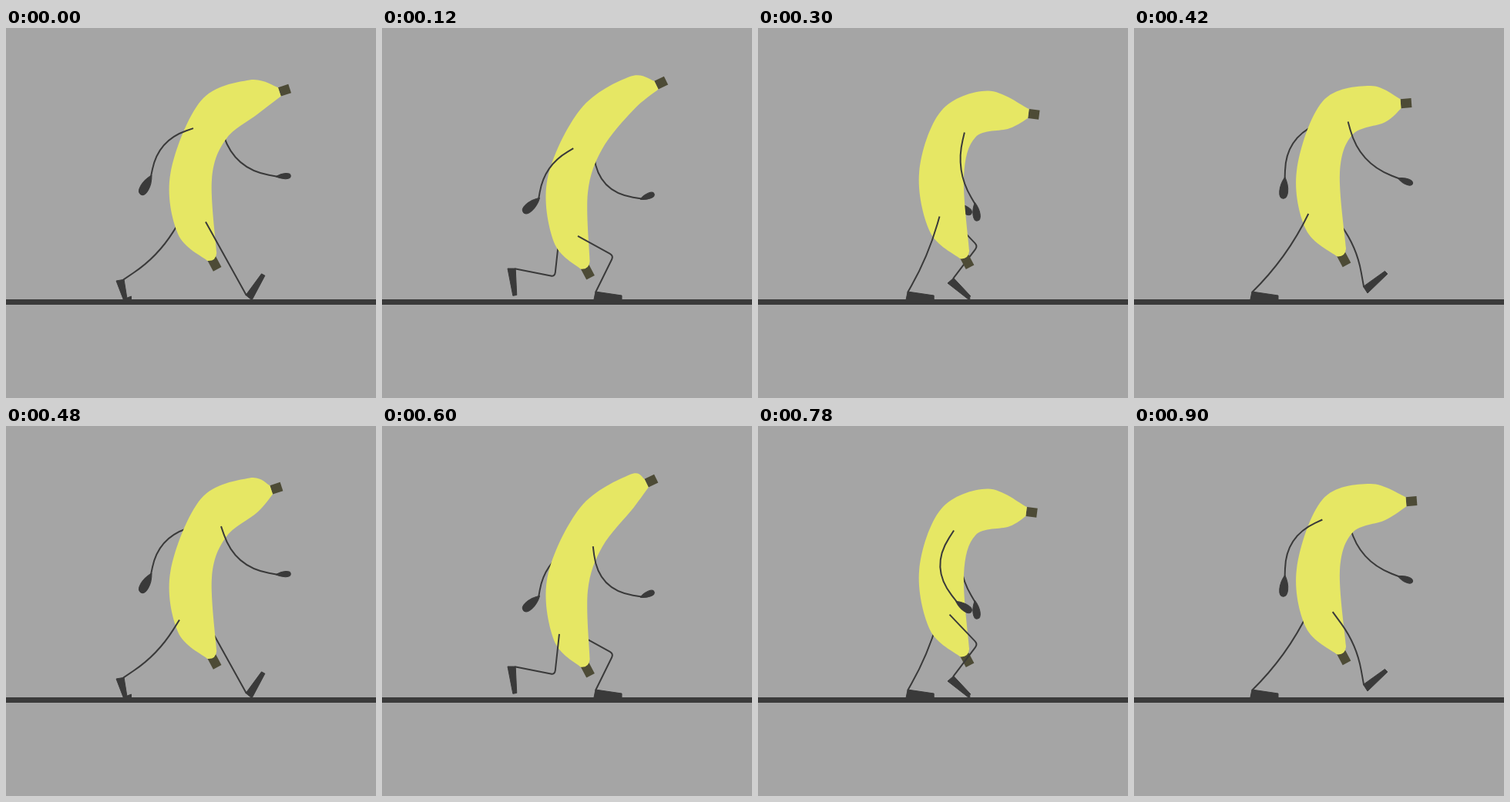
Write an HTML page with a canvas that moves like this. It is 480x480 px and loops after 0.96 s.

```html
<!DOCTYPE html>
<html lang="en">
<head>
<meta charset="utf-8">
<title>Walking banana</title>
<style>
  html, body { margin: 0; width: 100%; height: 100%; overflow: hidden; background: #a5a5a5; }
  canvas { display: block; width: 480px; height: 480px; }
</style>
</head>
<body>
<canvas id="stage" width="480" height="480"></canvas>
<script>
const ctx = document.getElementById('stage').getContext('2d');
const STEPS = 16, STEP_MS = 60, GROUND = 352;
const DARK = '#3a3a3a', YELLOW = '#e6e764', STEM = '#4d4b36', GREY = '#a5a5a5';
const BONE = 53, FOOT = 36;
const RAD = Math.PI / 180;

// One stride of the foot: step, heel x, heel y, pitch in degrees.
const STRIDE = [
  [0, 319, 353, -62],
  [2, 275, 352, 0],
  [7, 151, 352, 0],
  [8, 143, 328, 69],
  [10, 163, 312, 79],
  [13, 246, 331, 38],
  [15, 303, 344, -44]
];

const clamp = (v, lo, hi) => Math.max(lo, Math.min(hi, v));
const mix = (a, b, u) => a + (b - a) * u;

// Swing repeats once per loop, bob once per footfall.
const swing = (step, lag = 0) => Math.cos(step * Math.PI / 8 - lag * RAD);
const bob = (step, peak) => Math.cos((step - peak) * Math.PI / 4);

// Cyclic cubic interpolation that never overshoots its keys.
function strideAt(step) {
  const n = STRIDE.length;
  const key = i => {
    const turn = Math.floor(i / n), [t, ...v] = STRIDE[i - turn * n];
    return [t + turn * STEPS, ...v];
  };
  let i = n - 1;
  while (STRIDE[i][0] > step) i--;
  const [a, b, c, d] = [key(i - 1), key(i), key(i + 1), key(i + 2)];
  const h = c[0] - b[0], u = (step - b[0]) / h, v = 1 - u;
  const slope = (p, q, k) => (q[k] - p[k]) / (q[0] - p[0]);
  const tangent = (s, r) => s * r > 0 ? 2 * s * r / (s + r) : 0;
  return [1, 2, 3].map(k => {
    const mid = slope(b, c, k);
    const m0 = tangent(slope(a, b, k), mid), m1 = tangent(mid, slope(c, d, k));
    return (1 + 2 * u) * v * v * b[k] + u * u * (3 - 2 * u) * c[k] + h * u * v * (v * m0 - u * m1);
  });
}

function fill(color) {
  ctx.fillStyle = color;
  ctx.fill();
}

function stroke(color, width) {
  ctx.strokeStyle = color;
  ctx.lineWidth = width;
  ctx.stroke();
}

// Two-part line whose joint is pushed sideways by `bend` and softened by `round`.
function limb(x0, y0, x1, y1, bend, round) {
  const len = Math.hypot(x1 - x0, y1 - y0);
  const jx = (x0 + x1) / 2 + (y1 - y0) / len * bend;
  const jy = (y0 + y1) / 2 - (x1 - x0) / len * bend;
  ctx.beginPath();
  ctx.moveTo(x0, y0);
  ctx.lineTo(mix(jx, x0, round), mix(jy, y0, round));
  ctx.quadraticCurveTo(jx, jy, mix(jx, x1, round), mix(jy, y1, round));
  ctx.lineTo(x1, y1);
  stroke(DARK, 2);
}

function leg(step) {
  const hipX = 242 + 17 * swing(step), hipY = 254 + 16 * bob(step, 2.2);
  const [x, y, pitch] = strideAt(step);
  const c = Math.cos(pitch * RAD), s = Math.sin(pitch * RAD);
  const ankleX = x + 9 * s + 2 * c, ankleY = y - 9 * c + 2 * s;

  const dist = Math.hypot(ankleX - hipX, ankleY - hipY);
  const knee = Math.sqrt(Math.max(0, BONE * BONE - dist * dist / 4));
  limb(hipX, hipY, ankleX, ankleY, Math.max(knee, (hipX - ankleX) * .15), clamp((dist - 92) / 18, .1, 1));

  // Any length that would sink into the ground folds flat as toes.
  const reach = s > .1 ? Math.min(FOOT, (GROUND - y) / s) : FOOT;
  const toeX = x + reach * c, toeY = y + reach * s, fold = FOOT - reach;
  ctx.beginPath();
  ctx.moveTo(x, y);
  ctx.lineTo(toeX, toeY);
  if (fold > 1) {
    ctx.lineTo(toeX + fold, toeY);
    ctx.lineTo(toeX + fold, toeY - 4);
  }
  ctx.lineTo(toeX + 5 * s, toeY - 5 * c);
  ctx.lineTo(x + 10 * s + 2 * c, y - 10 * c + 2 * s);
  ctx.closePath();
  fill(DARK);
  stroke(DARK, 1);
}

function arm(step) {
  const shoulderX = 261 - 18 * swing(step), shoulderY = 140 + 19 * bob(step, 2.7);
  const wristX = 270 - 82 * swing(step) - 25 * swing(step, 90) ** 3;
  const wristY = 216 + 24 * bob(step, 3.7);
  limb(shoulderX, shoulderY, wristX, wristY, 9 * swing(step, 75) - 26, .8);

  const len = 22 + 5 * swing(step, 20), w = len * .28;
  ctx.save();
  ctx.translate(wristX, wristY);
  ctx.rotate((58 + 80 * swing(step, 40)) * RAD);
  ctx.beginPath();
  ctx.moveTo(-2, 0);
  ctx.bezierCurveTo(len * .4, -w, len, -w, len, 0);
  ctx.bezierCurveTo(len, w, len * .4, w, -2, 0);
  fill(DARK);
  stroke(DARK, 1);
  ctx.restore();
}

// Catmull-Rom curve through the points, continuing the current path.
function spline(pts) {
  const at = i => pts[clamp(i, 0, pts.length - 1)];
  ctx.lineTo(...pts[0]);
  for (let i = 0; i < pts.length - 1; i++) {
    const [a, b, c, d] = [at(i - 1), at(i), at(i + 1), at(i + 2)];
    ctx.bezierCurveTo(
      b[0] + (c[0] - a[0]) / 6, b[1] + (c[1] - a[1]) / 6,
      c[0] - (d[0] - b[0]) / 6, c[1] - (d[1] - b[1]) / 6, ...c);
  }
}

function stem(x, y, angle, len) {
  ctx.beginPath();
  ctx.moveTo(x, y);
  ctx.lineTo(x + len * Math.cos(angle), y + len * Math.sin(angle));
  stroke(STEM, 12);
}

function body(step) {
  const droop = bob(step, 5.4), dip = bob(step, 2.3);
  const tipX = 349.5 + 6.5 * swing(step, 35), tipY = 92 + 20 * droop;
  const tilt = (18 * droop - 10) * RAD;
  const sideX = 6 * Math.sin(tilt), sideY = 6 * Math.cos(tilt);
  const endX = 260.5 - 3 * dip, endY = 304 + 9 * dip;

  const back = [
    [tipX + sideX, tipY - sideY],
    [310 - 13 * droop, 72 + 10 * droop],
    [248 - 11 * droop, 103 + 9 * bob(step, 3.7)],
    [212 - 3 * droop, 190 + 6 * dip],
    [223, 269 + 9 * dip],
    [endX, endY]
  ];
  const front = [
    [endX + 12, endY - 10],
    [267, 200 + 14 * dip],
    [284 - 2 * droop, 147 + 10 * dip],
    [326, 118 + 13 * droop],
    [tipX - sideX, tipY + sideY]
  ];

  stem(tipX, tipY, tilt, 14);
  stem(endX + 5, endY - 4, 62 * RAD, 17);
  ctx.beginPath();
  spline(back);
  ctx.quadraticCurveTo(endX + 11, endY + 1, ...front[0]);
  spline(front);
  ctx.closePath();
  fill(YELLOW);
}

function draw(step) {
  const opposite = (step + STEPS / 2) % STEPS;
  ctx.fillStyle = GREY;
  ctx.fillRect(0, 0, 480, 480);
  ctx.fillStyle = DARK;
  ctx.fillRect(0, GROUND, 480, 7);
  ctx.lineJoin = 'round';
  leg(opposite);
  arm(opposite);
  body(step);
  leg(step);
  arm(step);
}

const start = performance.now();
function tick() {
  const t = Math.max(0, performance.now() - start);
  draw(Math.floor(t / STEP_MS) % STEPS);
  requestAnimationFrame(tick);
}
tick();
</script>
</body>
</html>
```
